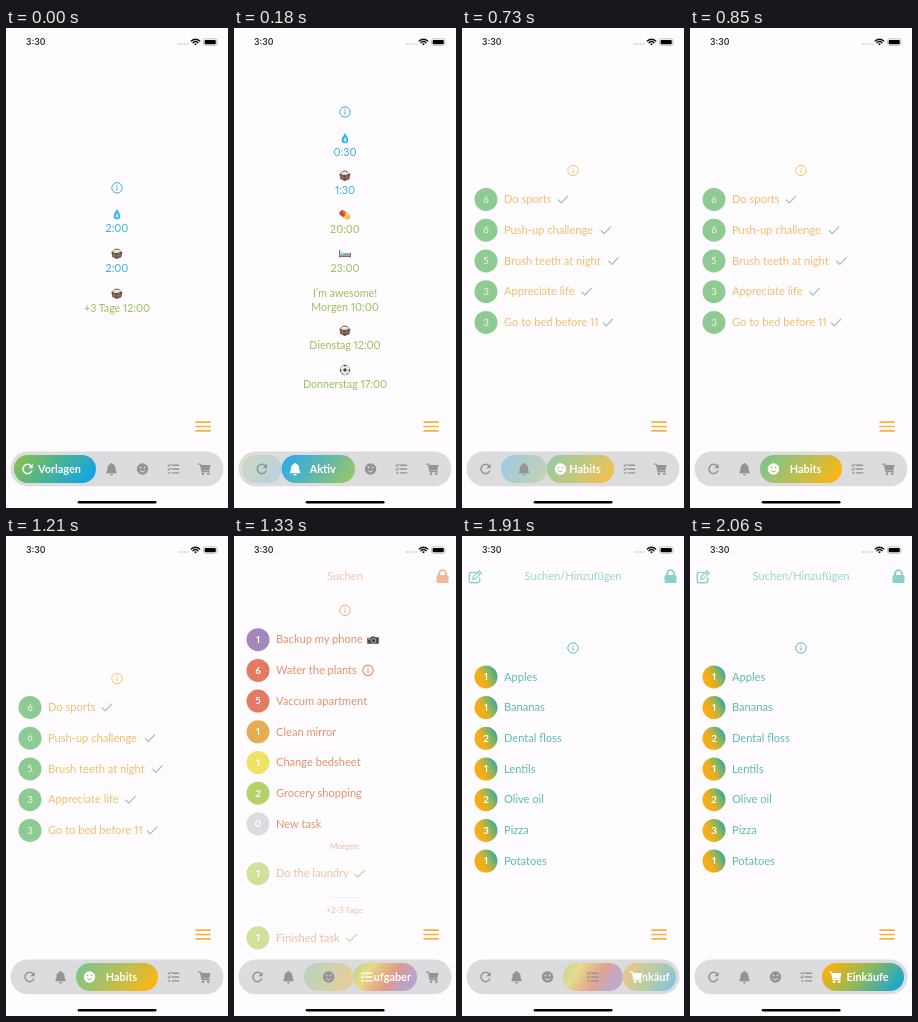
An HTML page for the animation above (2090 ms loop, 222 px wide and 480 px high).

```html
<!DOCTYPE html>
<html lang="de">
<head>
<meta charset="utf-8">
<style>
html, body { margin: 0; height: 100%; overflow: hidden; background: #fefcff; }
svg { font-family: Lato, "Open Sans", sans-serif; font-variant-numeric: proportional-nums; }
#stage { display: block; width: 100vw; height: 100vh; }
</style>
</head>
<body>
<svg id="stage" viewBox="0 0 222 480"></svg>
<script>
const LOOP = 2090, STEP = 30, SLOT = 31, GROW = 51;
const moves = [[30, 240], [610, 240], [1210, 270], [1850, 210]];
const BLUE = '#38b0d8', GREEN = '#97c258', AMBER = '#f2bf6c', RUST = '#e3936a', TEAL = '#5dbdb2';

const at = (x, y, s) => `<g transform="translate(${x} ${y})">${s}</g>`;
const fill = (d, c, extra = '') => `<path d="${d}" fill="${c}" ${extra}/>`;
const line = (d, c, w = 1.2) =>
  `<path d="${d}" fill="none" stroke="${c}" stroke-width="${w}" stroke-linecap="round" stroke-linejoin="round"/>`;
const dot = (r, c, x = 0, y = 0) => `<circle cx="${x}" cy="${y}" r="${r}" fill="${c}"/>`;
const text = (x, y, s, c, size = 11.1, anchor = 'start', weight = 400) =>
  `<text x="${x}" y="${y + size * .34}" fill="${c}" font-size="${size}" text-anchor="${anchor}" font-weight="${weight}">${s}</text>`;
const mid = (y, s, c, size = 10.7) => text(111, y, s, c, size, 'middle');
const gradient = (id, colors, y1, y2) =>
  `<linearGradient id="${id}" x1="0" y1="${y1}" x2="1" y2="${y2}">` +
  colors.map((c, i) => `<stop offset="${i / (colors.length - 1)}" stop-color="${c}"/>`).join('') + '</linearGradient>';

// Small pictures, each centred on the origin
const info = (x, y, c, w = 1) => at(x, y, `<circle r="5.2" fill="none" stroke="${c}" stroke-width="${w}"/>` +
  line('M0-.3V2.4', c, w) + dot(w * .65, c, 0, -2.3));
const check = (x, y, c) => line(`M${x - 4.7} ${y + .4}l3 3.1 6.4-6.7`, c, 1.2);
const lock = c => at(208.5, 40.8, `<rect x="-6" y="-1.8" width="12" height="8" rx="1.5" fill="${c}"/>` +
  line('M-3.4-1V-3.3a3.4 3.4 0 0 1 6.8 0V-1', c, 1.9));
const edit = c => at(13, 41, line('M1-4.6H-4A1.7 1.7 0 0 0-5.7-2.9V4A1.7 1.7 0 0 0-4 5.7H3A1.7 1.7 0 0 0 4.7 4V1', c, 1.4) +
  line('M-2.2 2.3L-1.8-.3 4.2-6.2 6.3-4.1.4 1.9zM2.7-4.7l2.1 2.1', c, 1.2));
const drop = fill('M0-5.2C1-2.5 3.3-.3 3.3 2A3.3 3.3 0 0 1-3.3 2C-3.3-.3-1-2.5 0-5.2z', '#2fb0e4') +
  fill('M.2-1.5C.8 0 1.8 1 1.8 2.4A1.7 1.7 0 0 1-1.5 2.4C-1.5 1-.2 0 .2-1.5z', '#b5e6f8');
const basket = line('M-4.6-2Q-3-5.6.8-4.8T3.6-1', '#5d4a3e', .9) +
  fill('M-5.6-2.6L-1-1 5.5-2.4 4.3 3.2-.4 5-4.6 3z', '#66513f') +
  fill('M-5-2.6L-.8-3.7 4.9-2.4-.8-1z', '#e6dcd0') +
  line('M-4.4.6L-.8 2 4.2.6M-2.8-.8L-2.4 3.4M2-.8L1.8 3.6', '#a98f76', .6);
const pill = '<g transform="rotate(35)"><rect x="-6" y="-2.8" width="12" height="5.6" rx="2.8" fill="#f2c34c"/>' +
  fill('M0-2.8H-3.2a2.8 2.8 0 0 0 0 5.6H0z', '#d4472f') + line('M-3.2-1.4H2.8', '#fbe5b8', .7) + '</g>';
const bed = fill('M-5.9-4H-4.8V3.8H-5.9zM4.8-1.2H5.9V3.8H4.8zM-5.4 1.4H5.4V2.9H-5.4z', '#8b6553') +
  fill('M-4.6-.8H4.8V1.5H-4.6z', '#6fa7c0') + fill('M-4.6-2H-1.2V.2H-4.6z', '#d3d9dc');
const ball = `<circle r="5" fill="#ececec" stroke="#888" stroke-width=".5"/>` +
  fill('M0-1.9L1.8-.6 1.1 1.5H-1.1L-1.8-.6zM-2-4.5L0-3.6 2-4.5 0-5zM4.8-1.3L3.5 0 4 2.6 5 .5zM-4.8-1.3L-3.5 0-4 2.6-5 .5zM1.3 4.8L2 3.2 3.8 3zM-1.3 4.8L-2 3.2-3.8 3z', '#444');
const camera = fill('M-5.8-2.2H-2.4L-1.6-3.6H1.6L2.4-2.7H5.8V3.8H-5.8z', '#4c4d52') +
  dot(2.5, '#aeb5bb', .6, .6) + dot(1.6, '#2d3443', .6, .6) + fill('M-4.8-1.6h1.8v1H-4.8z', '#ddd');

const icons = [
  c => line('M3.5-3.1A4.6 4.6 0 1 0 4.2 2', c, 1.5) + fill('M5.2-5.3V-.8H.8z', c),
  c => fill('M0-6C-.8-6-1-5.5-1-5-3-4.5-4-3-4-1-4 2-5 2.6-5.3 3.6-5.4 4-5 4.3-4.7 4.3H4.7C5 4.3 5.4 4 5.3 3.6 5 2.6 4 2 4-1 4-3 3-4.5 1-5 1-5.5.8-6 0-6zM-1.6 5H1.6A1.6 1.6 0 0 1-1.6 5z', c),
  c => fill('M-5.7 0a5.7 5.7 0 1 0 11.4 0a5.7 5.7 0 1 0-11.4 0zM-2.9-1.6a.9.9 0 1 0 1.8 0a.9.9 0 1 0-1.8 0zM1.1-1.6a.9.9 0 1 0 1.8 0a.9.9 0 1 0-1.8 0zM-3 1.3Q0 5.6 3 1.3L2.4.9Q0 3.7-2.4.9z', c, 'fill-rule="evenodd"'),
  c => line('M-1.2-3.8H5.2M-1.2 0H5.2M-1.2 3.9H5.2', c, 1.4) +
    line('M-5.5-3.8l1 1 1.8-2M-5.5 0l1 1 1.8-2', c, 1.1) + dot(1, c, -4.2, 3.9),
  c => line('M-6-4.9H-4L-2.4 2.5H4.6', c, 1.3) + fill('M-3.8-4H6L4.7 1.4H-2.7z', c) +
    dot(1.3, c, -1.5, 4.7) + dot(1.3, c, 3.8, 4.7)
];

const row = (y, n, label, disc, color, weight = 700, ink = '#fff') =>
  dot(11.5, disc, 24, y) + text(24, y, n, ink, 9.8, 'middle', weight) + text(42, y, label, color);

const habits = [[6, 'Do sports', 101], [6, 'Push-up challenge', 144], [5, 'Brush teeth at night', 151.5],
  [3, 'Appreciate life', 124.5], [3, 'Go to bed before 11', 146]];
const tasks = [[1, 'Backup my phone', '#a588bb'], [6, 'Water the plants', '#e27b62'], [5, 'Vaccum apartment', '#e27b62'],
  [1, 'Clean mirror', '#e6ac50'], [1, 'Change bedsheet', '#efe363'], [2, 'Grocery shopping', '#b5d269'], [0, 'New task', '#dddbdf']];
const shopping = [[1, 'Apples'], [1, 'Bananas'], [2, 'Dental floss'], [1, 'Lentils'], [2, 'Olive oil'], [3, 'Pizza'], [1, 'Potatoes']];
const done = (y, label, x) => row(y, 1, label, '#cfe19b', '#f0c1a3') + check(x, y, '#c3d998');

const screens = [
  info(111, 159.8, BLUE) + at(111, 186, drop) + mid(200, '2:00', BLUE) + at(111, 226, basket) + mid(240, '2:00', BLUE) +
    at(111, 266, basket) + mid(280, '+3 Tage 12:00', GREEN),
  info(111, 84, BLUE) + at(111, 110, drop) + mid(124, '0:30', BLUE) + at(111, 148, basket) + mid(162.5, '1:30', BLUE) +
    at(111, 187, pill) + mid(201.5, '20:00', GREEN) + at(111, 226, bed) + mid(240, '23:00', GREEN) +
    mid(265, 'I’m awesome!', GREEN) + mid(279, 'Morgen 10:00', GREEN) + at(111, 303, basket) +
    mid(317.5, 'Dienstag 12:00', GREEN) + at(111, 342, ball) + mid(356, 'Donnerstag 17:00', GREEN),
  info(111, 142.5, '#f4c565') + habits.map(([n, s, x], i) => {
    const y = 171.4 + i * 30.75;
    return row(y, n, s, '#8ecb92', AMBER, 400, '#f2f7ec') + check(x, y, '#9cc4a0');
  }).join(''),
  mid(40.6, 'Suchen', '#f1c6a9', 11.2) + lock('#efba98') + info(111, 74.3, '#ecb08a') +
    tasks.map(([n, s, c], i) => row(103.7 + i * 30.7, n, s, c, RUST)).join('') +
    at(139, 104, camera) + info(134, 134.3, '#e29262', 1.2) + mid(310, 'Morgen:', '#efbd9d', 8.2) +
    done(337.7, 'Do the laundry', 125.5) + line('M96 361.5H127', '#eee6e4', .6) +
    mid(374, '+2-3 Tage:', '#efbd9d', 8.2) + done(401.8, 'Finished task', 117.5),
  edit('#8ed0c9') + mid(40.6, 'Suchen/Hinzufügen', '#9cd6ce', 11.1) + lock('#8ccfcb') + info(111, 112, TEAL) +
    shopping.map(([n, s], i) => row(140.9 + i * 30.7, n, s, 'url(#item)', TEAL)).join('')
];

const labels = ['Vorlagen', 'Aktiv', 'Habits', 'Aufgaben', 'Einkäufe'];
const hues = [['#82c052', '#45b29a', '#12a4e4'], ['#0ca2ec', '#45b1a0', '#8ac152'], ['#7fc489', '#b9bf55', '#fdb512'],
  ['#b9d35f', '#f0da55', '#e9a54c', '#e2775e', '#b482ac', '#a484bb'], ['#fcb010', '#8cb95c', '#14a6d4']];

const status = text(20, 14.2, '3:30', '#333', 8.7, 'start', 600).replace('<text', '<text font-family="Inter, sans-serif"') +
  [173, 176, 179, 182].map(x => dot(.8, '#b5b4b8', x, 16)).join('') +
  at(189.5, 17, line('M-4.2-4.1a6 6 0 0 1 8.4 0M-2.5-2.2a3.6 3.6 0 0 1 5 0', '#111', 1.4) + dot(1, '#111', 0, -.7)) +
  '<rect x="197.5" y="10.8" width="13.4" height="6.6" rx="2" fill="none" stroke="#aaa" stroke-width=".7"/>' +
  '<rect x="198.6" y="11.9" width="11.2" height="4.4" rx="1.1" fill="#000"/>' + fill('M211.6 13q1.2 1 0 2.2z', '#aaa');

const stage = document.getElementById('stage');
stage.innerHTML = '<defs>' + hues.map((h, i) => gradient('tab' + i, h, .35, .65)).join('') +
  gradient('item', ['#fbad10', '#f5ad18', '#8fb65c', '#28a6a8'], .75, .25) + '</defs>' +
  '<rect width="222" height="480" fill="#fefcff"/>' + status +
  screens.map(s => `<g class="screen">${s}</g>`).join('') +
  line('M190 394.1H204.2M190 398.5H204.2M190 402.9H204.2', '#fbb03a', 1.6) +
  '<rect x="4.5" y="423.5" width="213" height="34.7" rx="17.3" fill="#dcdbdd"/><g id="menu"></g>' +
  '<rect x="71.7" y="472.9" width="78.8" height="2.7" rx="1.35" fill="#000"/>';
const pages = stage.querySelectorAll('.screen'), menu = document.getElementById('menu');

function tab(i, x, share, active) {
  const w = SLOT + GROW * share;
  let s = share ? `<rect x="${x}" y="427" width="${w}" height="28" rx="14" fill="url(#tab${i})" opacity="${share}"/>` : '';
  if (active) {
    s += `<svg x="${x + 20}" y="427" width="${w - 26}" height="28">` +
      text(w / 2 - 15.5, 14.3, labels[i], '#fff', 10.9, 'middle', 700) + '</svg>';
  }
  return s + at(x + (active ? 13.5 : w / 2), 441, icons[i](active ? '#fff' : '#949397'));
}

function draw() {
  const t = performance.now() % LOOP;
  const from = moves.filter(m => m[0] <= t).length - 1, to = from + 1;
  let p = 1;
  if (from >= 0) {
    const [start, span] = moves[from];
    const passed = Math.floor((t - start) / STEP) * STEP;
    p = Math.sin(Math.min(passed / span, 1) * Math.PI / 2);
  }
  const active = p > 0 ? to : from;
  pages.forEach((g, i) => g.style.display = i === active ? '' : 'none');
  let x = 8;
  menu.innerHTML = labels.map((_, i) => {
    const share = i === to ? p : i === from ? 1 - p : 0;
    const s = tab(i, x, share, i === active);
    x += SLOT + GROW * share;
    return s;
  }).join('');
  requestAnimationFrame(draw);
}
draw();
</script>
</body>
</html>
```
